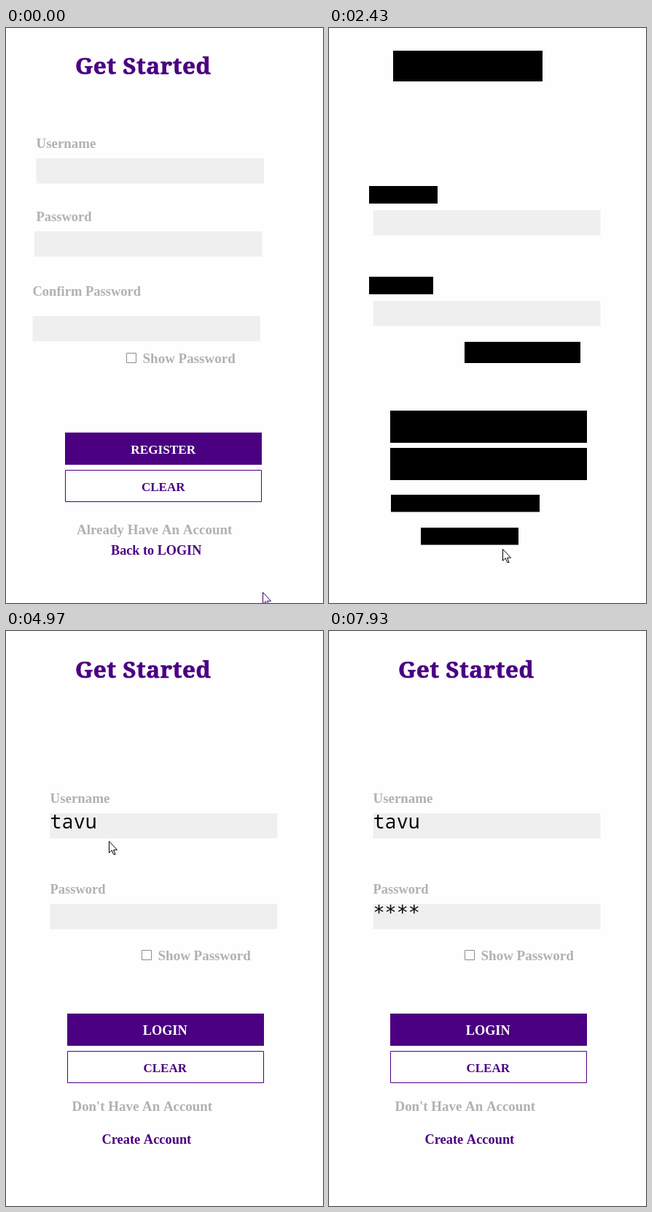
An HTML page with a canvas for the animation above (8 s loop, 435x786 px).

```html
<!DOCTYPE html>
<html lang="en">
<head>
<meta charset="utf-8">
<title>Sign-up and login forms</title>
<style>
  html, body { margin: 0; width: 100%; height: 100%; overflow: hidden; background: #fefefe; }
  canvas { display: block; }
</style>
</head>
<body>
<canvas id="stage" width="435" height="786"></canvas>
<script>
const ctx = document.getElementById('stage').getContext('2d');
const LOOP = 8000;
const PAPER = '#fefefe', FIELD = '#efefef', LABEL = '#b2b0b3', INDIGO = '#4b0082';
const DARK = '#35005c';
const SERIF = '"Liberation Serif", "Times New Roman", serif';
const SLAB = '"Noto Serif", serif';
const MONO = '"Noto Sans Mono", "DejaVu Sans Mono", monospace';
const STARS = '"DejaVu Sans Mono", monospace';
const PITCH = 16.1;
const USER = 'tavu';

const LOGIN_AT = 2430, READY_AT = 2500;
const userKeys = [3950, 4025, 4100, 4270];
const passKeys = [6220, 6540, 7000, 7380];

// Pointer moves: start, end, number of steps, from, to
const moves = [
  [70, 180, 3, [352, 771], [311, 753]],
  [790, 1260, 7, [311, 753], [247, 725]],
  [1420, 1800, 6, [247, 725], [238, 712]],
  [2890, 3200, 5, [238, 712], [141, 279]],
  [4970, 5350, 6, [141, 279], [147, 387]]
];

const within = (t, a, b) => t >= a && t < b;
const typed = (keys, t) => keys.filter(k => t >= k).length;

function box(x, y, w, h, color) {
  ctx.fillStyle = color;
  ctx.fillRect(x, y, w, h);
}

function text(str, x, y, size, color, align = 'left') {
  ctx.font = `bold ${size}px ${SERIF}`;
  ctx.textAlign = align;
  ctx.fillStyle = color;
  ctx.fillText(str, x, y);
}

function heading(y) {
  ctx.font = `bold 31.5px ${SLAB}`;
  ctx.letterSpacing = '0.5px';
  ctx.textAlign = 'left';
  ctx.fillStyle = ctx.strokeStyle = INDIGO;
  ctx.lineWidth = 0.7;
  ctx.lineJoin = 'round';
  ctx.fillText('Get Started', 95, y);
  ctx.strokeText('Get Started', 95, y);
  ctx.letterSpacing = '0px';
}

function frame(x, y, w, h, color) {
  ctx.strokeStyle = color;
  ctx.lineWidth = 1;
  ctx.strokeRect(x + 0.5, y + 0.5, w - 1, h - 1);
}

function buttons(x, y, name, mid) {
  box(x, y, 270, 44, INDIGO);
  text(name, mid, y + 28.5, name === 'LOGIN' ? 18.3 : 17.2, PAPER, 'center');
  frame(x, y + 51, 270, 44, INDIGO);
  text('CLEAR', mid, y + 79.5, 17, INDIGO, 'center');
}

function showPassword(x, y) {
  frame(x, y, 14, 14, '#8d8b8e');
  text('Show Password', x + 22.5, y + 13.5, 19, LABEL);
}

function signUp() {
  heading(62.5);
  text('Username', 41.5, 164, 18.9, LABEL);
  box(41.5, 178, 312.5, 34.5, FIELD);
  text('Password', 41.5, 264, 18.5, LABEL);
  box(39, 278, 312.5, 34.5, FIELD);
  text('Confirm Password', 36.5, 366, 18.5, LABEL);
  box(36.5, 394, 312.5, 34.5, FIELD);
  showPassword(165, 444);
  buttons(81, 553, 'REGISTER', 215.7);
  text('Already Have An Account', 97, 691.5, 19, LABEL);
  text('Back to LOGIN', 144, 720, 18.2, INDIGO);
}

function loginFields() {
  box(60.5, 249, 312, 34.5, FIELD);
  box(60.5, 373, 312, 34.5, FIELD);
}

function login() {
  heading(63.5);
  text('Username', 60.5, 235, 18.9, LABEL);
  text('Password', 60.5, 359, 18.5, LABEL);
  showPassword(186, 436);
  buttons(84, 523, 'LOGIN', 218.2);
  text("Don't Have An Account", 90.5, 656, 18.9, LABEL);
  text('Create Account', 131.5, 701, 18.4, INDIGO);
}

// Labels that have not been painted yet
function blankLogin() {
  [[88, 31, 205, 42], [55, 216, 94, 24], [55, 340, 88, 24], [186, 429, 159, 29],
   [84, 523, 270, 44], [84, 574, 270, 44], [85, 638, 204, 23.5], [126, 683, 134, 23.5]]
    .forEach(b => box(...b, '#000'));
}

function entry(str, y, family) {
  ctx.font = `26.7px ${family}`;
  ctx.textAlign = 'left';
  ctx.fillStyle = '#0a0a0a';
  [...str].forEach((c, i) => ctx.fillText(c, 60.5 + i * PITCH, y));
}

function caret(chars, y, color = '#111') {
  box(60 + Math.round(chars * PITCH), y, 1.4, 27.5, color);
}

function drawEntries(t) {
  const u = typed(userKeys, t), p = typed(passKeys, t);
  entry(USER.slice(0, u), 270, MONO);
  entry('*'.repeat(p), 394, STARS);
  const userCaret = t < 5670 && !within(t, 2990, 3500) && !within(t, 4800, 5330);
  if (userCaret) caret(u, 249, u ? '#111' : DARK);
  if (within(t, 5670, 7930)) caret(p, 373);
}

function pointerAt(t) {
  let pos = moves[0][3];
  for (const [start, end, n, a, b] of moves) {
    if (t < start) break;
    const k = Math.min(n, 1 + Math.floor((t - start) * (n - 1) / (end - start) + 1e-6));
    const u = k / n, e = u * u * (3 - 2 * u);
    pos = [a[0] + (b[0] - a[0]) * e, a[1] + (b[1] - a[1]) * e];
  }
  return pos.map(Math.round);
}

function pointerKind(t, x, y) {
  const over = (l, top, r, bottom) => x >= l && x <= r && y >= top && y <= bottom;
  if (t < LOGIN_AT) return over(138, 702, 275, 728) ? 'hand' : 'arrow';
  if (over(60, 249, 372, 283) || over(60, 373, 372, 407)) return 'beam';
  return over(126, 683, 260, 706) ? 'hand' : 'arrow';
}

const arrowPath = new Path2D(
  'M.5 .5V16.2L4.2 12.7L6.7 18.5H9L6.6 12.2H11.5Z');
const handPath = new Path2D(
  'M-.5 13V2Q-.5 .5 1 .5T2.5 2V6.5Q3.5 5.5 5.5 7Q7 6.2 8.3 8Q11.5 7.5 11.5 10V14.5' +
  'L9.5 18V21.5H.5V19L-4 12.5Q-5 10.5-3 10.3Q-1.5 11-.5 13Z');
const knuckles = new Path2D('M2.5 6V11M5.5 7V11M8.5 8V11.5');
const beamPath = new Path2D(
  'M-1.5-6.5H1.2Q2.5-6.5 2.5-5Q2.5-6.5 3.8-6.5H6.5M2.5-5.5V7.5' +
  'M-1.5 8.5H1.2Q2.5 8.5 2.5 7Q2.5 8.5 3.8 8.5H6.5');

function drawPointer(t) {
  if (within(t, userKeys[0], 4970) || t >= passKeys[0]) return;
  const [x, y] = pointerAt(t);
  const kind = pointerKind(t, x, y);
  ctx.save();
  ctx.translate(x, y);
  if (within(t, 2290, LOGIN_AT) || within(t, 5670, 5820)) {
    ctx.fillStyle = 'rgba(255, 255, 0, .5)';
    ctx.beginPath();
    ctx.arc(0, 0, 15, 0, Math.PI * 2);
    ctx.fill();
  }
  ctx.strokeStyle = kind === 'beam' ? '#4a4a14' : kind === 'arrow' && t < LOGIN_AT ? DARK : '#000';
  ctx.fillStyle = '#fff';
  ctx.lineWidth = 1;
  if (kind === 'beam') {
    ctx.stroke(beamPath);
  } else {
    const shape = kind === 'hand' ? handPath : arrowPath;
    ctx.fill(shape);
    ctx.stroke(shape);
    if (kind === 'hand') ctx.stroke(knuckles);
  }
  ctx.restore();
}

function draw(t) {
  box(0, 0, 435, 786, PAPER);
  if (t < LOGIN_AT) {
    signUp();
    if (t >= 2290) box(41, 178, 1.4, 27.5, DARK);
  } else {
    loginFields();
    if (t < READY_AT) {
      blankLogin();
    } else {
      login();
      drawEntries(t);
    }
  }
  drawPointer(t);
}

const begin = performance.now();
function tick() {
  draw((performance.now() - begin) % LOOP);
  requestAnimationFrame(tick);
}
tick();
</script>
</body>
</html>
```
